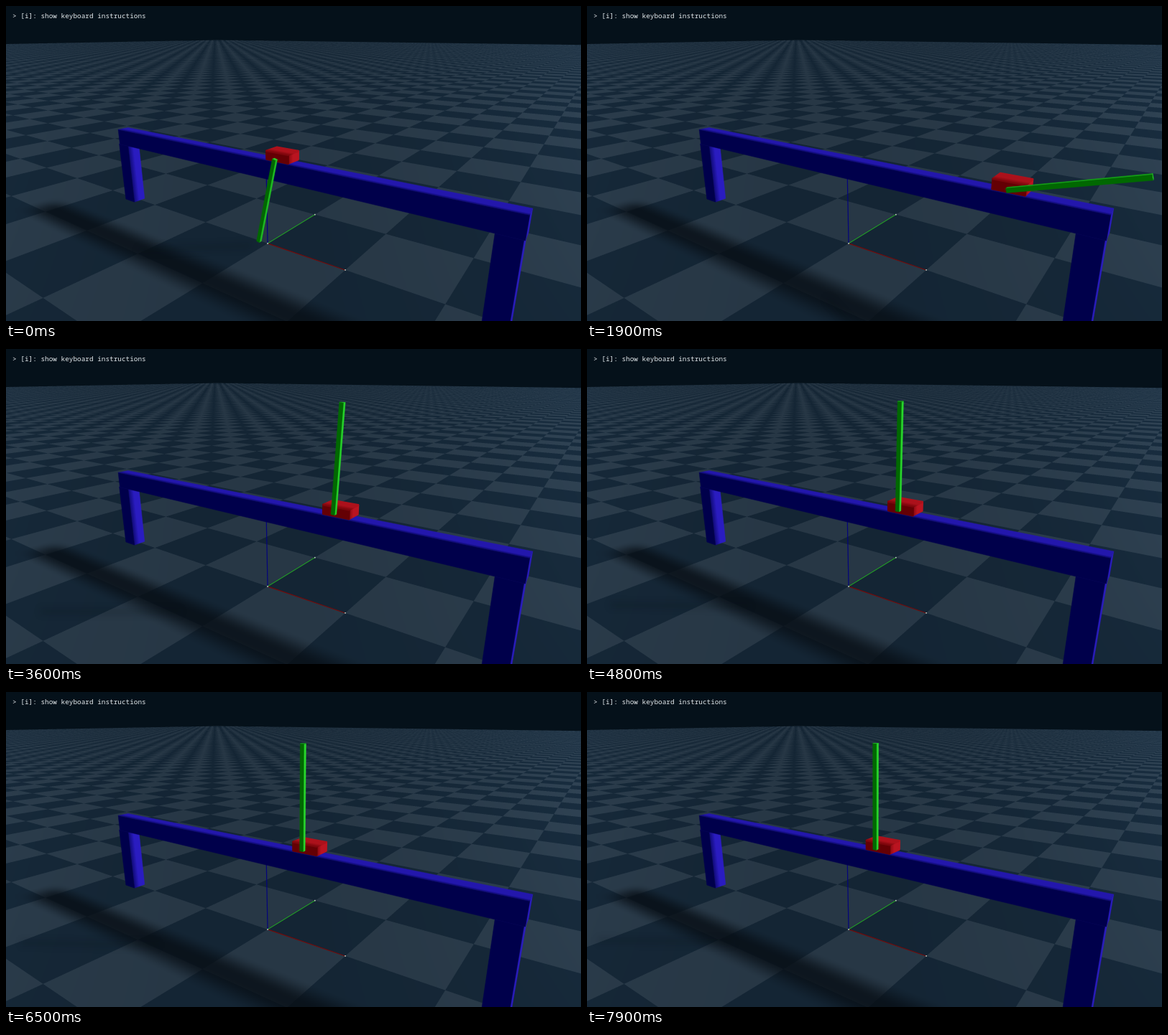
An HTML page with a canvas for the animation above (8000 ms loop, 800 px wide and 439 px high).

```html
<!DOCTYPE html>
<html lang="en">
<head>
<meta charset="utf-8">
<title>Cart-pole swing-up</title>
<style>
  html, body { margin: 0; width: 800px; height: 439px; overflow: hidden; background: #05111a; }
  canvas { display: block; }
  p { position: absolute; left: 9px; top: 7px; margin: 0; white-space: pre; color: #e6ebee;
      font: 9.4px/13px "Noto Sans Mono", "DejaVu Sans Mono", monospace; }
</style>
</head>
<body>
<canvas width="800" height="439"></canvas>
<p>&gt; [i]: show keyboard instructions</p>
<script>
const W = 800, H = 439, FOCAL = 603, CX = W / 2, CY = H / 2;
const CAM_Z = 2.3, CAM_FWD = 4.455, CAM_SIDE = -0.294;
const SIN_P = 0.2897, COS_P = 0.957;   // camera pitch
const SIN_A = 0.5764, COS_A = 0.8171;  // camera heading
const LIGHT = [0.666, 0.5, 0.555];
const UPRIGHT = [[1, 0, 0], [0, 1, 0], [0, 0, 1]];
const ctx = document.querySelector('canvas').getContext('2d');

function project([x, y, z]) {
  const side = CAM_SIDE + COS_A * x + SIN_A * y;
  const fwd = CAM_FWD - SIN_A * x + COS_A * y;
  const depth = fwd * COS_P + (CAM_Z - z) * SIN_P;
  return [CX + FOCAL * side / depth,
          CY + FOCAL * ((CAM_Z - z) * COS_P - fwd * SIN_P) / depth];
}

const clamp = v => Math.max(0, Math.min(1, v));
const smooth = (a, b, v) => { const k = clamp((v - a) / (b - a)); return k * k * (3 - 2 * k); };
const mix = (a, b, k) => a.map((v, i) => v + (b[i] - v) * k);
const dot = (a, b) => a.reduce((sum, v, i) => sum + v * b[i], 0);

// Colour of the floor or sky seen through one point of the picture
const SKY = [5, 17, 26], DARK = [20, 37, 52], PALE = [39, 55, 69], SHADOW = [7, 14, 21];
function backdrop(px, py) {
  const u = (px - CX) / FOCAL, v = (py - CY) / FOCAL, down = SIN_P + v * COS_P;
  if (down <= 0) return SKY;
  const s = CAM_Z / down;
  const fwd = (COS_P - v * SIN_P) * s - CAM_FWD, side = u * s - CAM_SIDE;
  const x = COS_A * side - SIN_A * fwd, y = COS_A * fwd + SIN_A * side;
  if (x < -100 || y > 100) return SKY;
  const tile = (Math.floor(x) + Math.floor(y)) & 1 ? PALE : DARK;
  const gain = 1 + 0.25 * ((px - 330) / 470) ** 2 * (1 - 0.6 * py / H);
  const shade = (1 - smooth(0.03, 0.34, Math.abs(y + 0.92))) * smooth(-3.5, -2.9, x);
  return mix(tile.map(c => c * gain), SHADOW, 0.8 * shade);
}

function paintBackdrop() {
  const layer = document.createElement('canvas');
  layer.width = W;
  layer.height = H;
  const c = layer.getContext('2d'), img = c.createImageData(W, H);
  for (let y = 0, i = 0; y < H; y++) {
    const rows = y < 36 ? 1 : y < 130 ? 8 : 3, cols = y < 36 ? 1 : 3, n = rows * cols;
    for (let x = 0; x < W; x++, i += 4) {
      let r = 0, g = 0, b = 0;
      for (let k = 0; k < n; k++) {
        const col = backdrop(x + (k % cols + 0.5) / cols, y + (Math.floor(k / cols) + 0.5) / rows);
        r += col[0]; g += col[1]; b += col[2];
      }
      img.data.set([r / n, g / n, b / n, 255], i);
    }
  }
  c.putImageData(img, 0, 0);
  return layer;
}

function poly(points, fill, edge) {
  ctx.beginPath();
  points.forEach(p => ctx.lineTo(...p));
  ctx.closePath();
  ctx.fillStyle = ctx.strokeStyle = fill;
  ctx.lineWidth = edge;
  ctx.lineJoin = 'round';
  ctx.fill();
  ctx.stroke();
}

function line(a, b, color, width) {
  ctx.beginPath();
  ctx.moveTo(...a);
  ctx.lineTo(...b);
  ctx.strokeStyle = color;
  ctx.lineWidth = width;
  ctx.stroke();
}

// Gradient from edge p-q straight across to the parallel edge through r
function across(p, q, r, from, to) {
  const ex = q[0] - p[0], ey = q[1] - p[1];
  const k = ((r[1] - p[1]) * ex - (r[0] - p[0]) * ey) / (ex * ex + ey * ey || 1);
  const g = ctx.createLinearGradient(p[0], p[1], p[0] - ey * k, p[1] + ex * k);
  g.addColorStop(0, `rgb(${from})`);
  g.addColorStop(0.5, `rgb(${to})`);
  return g;
}

// A box with softened edges: centre, unit axes, half sizes, and its unlit and lit colours
function box(center, axes, half, dark, lit, edge = 0.5) {
  const at = signs => project(center.map((c, k) =>
    c + axes.reduce((sum, axis, i) => sum + axis[k] * half[i] * signs[i], 0)));
  for (let i = 0; i < 3; i++) for (const side of [-1, 1]) {
    const j = (i + 1) % 3, k = (i + 2) % 3;
    const corner = (a, b) => {
      const signs = [];
      signs[i] = side; signs[j] = a; signs[k] = b;
      return at(signs);
    };
    const pts = [corner(-1, -1), corner(1, -1), corner(1, 1), corner(-1, 1)];
    const [a, b, c, d] = pts;
    const turn = (b[0] - a[0]) * (c[1] - b[1]) - (b[1] - a[1]) * (c[0] - b[0]);
    if (turn * side >= 0) continue;
    const shade = clamp(1.5 * side * dot(axes[i], LIGHT));
    const from = mix(dark, lit, shade * 0.35), to = mix(dark, lit, shade);
    // Lit faces darken towards the front edge
    poly(pts, i === 0 ? across(a, d, b, from, to) : across(a, b, d, from, to), edge);
  }
}

function drawAxes() {
  const [o, x, y, z] = [[0, 0, 0], ...UPRIGHT].map(project);
  line(o, z, '#04047c', 1.2);
  line(o, x, '#700a0a', 1.1);
  line(o, y, '#22ac22', 1.1);
  ctx.fillStyle = '#c9d6c9';
  for (const [px, py] of [o, x, y]) ctx.fillRect(px - 0.8, py - 0.8, 1.6, 1.6);
}

function drawFrame() {
  const part = (center, half) => box(center, UPRIGHT, half, [0, 0, 75], [42, 28, 192]);
  for (const x of [-2.425, 2.425]) part([x, -0.015, 0.41], [0.1, 0.085, 0.41]);
  part([0.015, -0.025, 0.923], [2.52, 0.078, 0.103]);
}

// The cart dashes right, turns back, then creeps towards its rest position
function cartX(t) {
  if (t < 1.2) return 0.196 + 2.033 * smooth(0, 1.2, t);
  if (t < 1.9) return 2.229 - 0.459 * ((t - 1.2) / 0.7) ** 2;
  return 0.23 + 0.653 * Math.exp(-0.26 * (t - 3.6)) + 0.52 * Math.exp(-2.5 * (t - 1.9));
}

// Degrees from upright, growing towards +x: trail behind, swing up, settle
function poleAngle(t) {
  if (t < 0.75) return 193.5 + 42.5 * Math.sin(Math.PI / 2 * t / 0.75);
  if (t < 1.9) return 236 - 163.3 * ((t - 0.75) / 1.15) ** 1.82;
  return 72.7 * Math.exp(-1.87 * (t - 1.9));
}

const floor = paintBackdrop();

function draw(t) {
  const x = cartX(t), a = poleAngle(t) * Math.PI / 180, s = Math.sin(a), c = Math.cos(a);
  const pivotZ = 1.055, len = 1.025;
  const shadow = (px, z) => project([px - 1.2 * z, -0.1 - 0.8 * z, 0]);

  ctx.drawImage(floor, 0, 0);
  ctx.filter = 'blur(4px)';
  line(shadow(x, pivotZ), shadow(x + s * len, pivotZ + c * len), 'rgba(4,12,19,.14)', 9);
  ctx.filter = 'none';
  drawAxes();
  drawFrame();
  box([x, 0.03, 1.07], UPRIGHT, [0.138, 0.09, 0.045], [100, 0, 4], [186, 20, 32], 3);
  box([x + s * len / 2, -0.1, pivotZ + c * len / 2], [[c, 0, -s], [0, 1, 0], [s, 0, c]],
    [0.019, 0.019, len / 2], [1, 104, 1], [40, 216, 44]);
}

function tick(now) {
  draw(Math.floor(now % 8000 / 100) / 10);
  requestAnimationFrame(tick);
}
requestAnimationFrame(tick);
</script>
</body>
</html>
```
